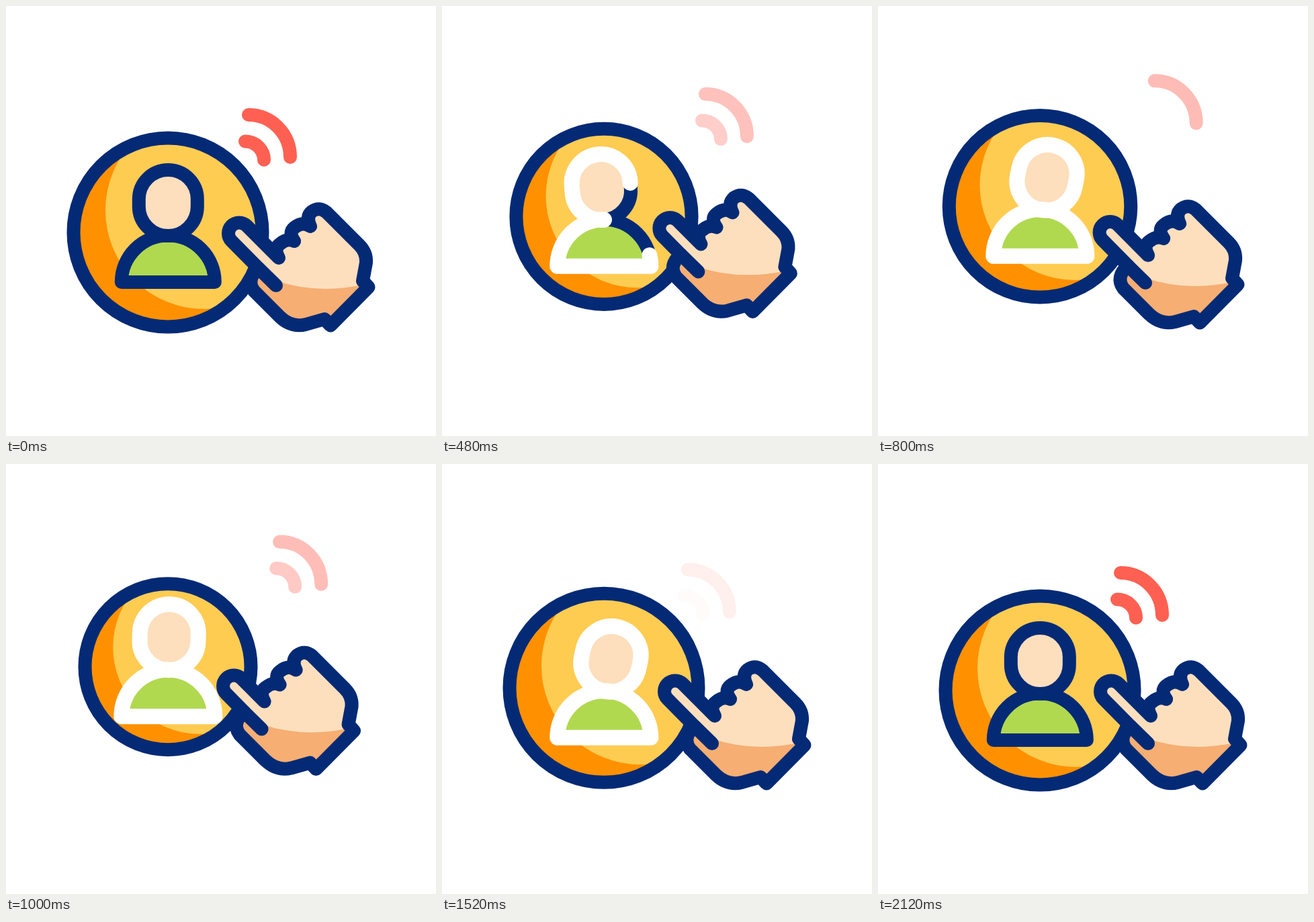
An HTML page with a canvas for the animation above (2.24 s loop, 640 by 640 pixels).

```html
<!DOCTYPE html>
<html lang="en">
<head>
<meta charset="utf-8">
<title>Tap on profile</title>
<style>
  html, body { margin: 0; width: 100%; height: 100%; overflow: hidden; background: #fff; }
  canvas { display: block; width: 640px; height: 640px; }
</style>
</head>
<body>
<canvas id="stage"></canvas>
<script>
const LOOP = 2240, STEP = 40;
const NAVY = '#042a76', RED = '#ff6052', SKIN = '#fddfbd', TAN = '#f6ae73';
const GREEN = '#b0d94f', YELLOW = '#ffcc52', ORANGE = '#ff9100';

// Keys are [time in ms, value].
const RISE = [[0, 0], [840, 1], [1680, 0]];
const PRESS = [[0, 0], [320, 17], [680, 0], [1005, 17], [1340, 0]];
const TAP = [[60, 0], [410, 24], [705, 0], [1075, 24], [1425, 0]];
const TILT = [[0, 0], [333, -10], [805, 12], [1210, -10], [1530, 12], [2000, 0]];
const TRACE = [[250, 0], [595, 1], [1710, 1], [2120, 0]];
const WAVE_OUT = [[0, 1], [335, 0], [710, 1], [865, 0], [1190, 1], [1200, 1], [1556, 0], [1690, 1]];
const WAVE_IN = [[0, 1], [220, 0], [400, 0], [660, 1], [790, 0], [930, 0], [1140, 1], [1530, 0], [1690, 1]];

const smooth = s => s * s * (3 - 2 * s);
const linear = s => s;

function at(keys, t, ease = smooth) {
  if (t <= keys[0][0]) return keys[0][1];
  for (let i = 1; i < keys.length; i++) {
    const [t0, a] = keys[i - 1], [t1, b] = keys[i];
    if (t < t1) return a + (b - a) * ease((t - t0) / (t1 - t0));
  }
  return keys[keys.length - 1][1];
}

const canvas = document.getElementById('stage');
const ctx = canvas.getContext('2d');
const ratio = window.devicePixelRatio || 1;
canvas.width = canvas.height = 640 * ratio;

function disc(x, y, r) {
  const p = new Path2D();
  p.arc(x, y, r, 0, Math.PI * 2);
  return p;
}

function fill(path, color) {
  ctx.fillStyle = color;
  ctx.fill(path);
}

function stroke(path, color = NAVY, width = 20) {
  ctx.strokeStyle = color;
  ctx.lineWidth = width;
  ctx.stroke(path);
}

function group(draw) {
  ctx.save();
  draw();
  ctx.restore();
}

// Both person shapes start at the neck, which is their origin.
const PI = Math.PI, HEAD_R = 43.5, HEAD_SIDE = 11, BODY_R = 69.5;

const head = new Path2D();
head.arc(0, -HEAD_R, HEAD_R, PI / 2, PI);
head.arc(0, -HEAD_R - HEAD_SIDE, HEAD_R, PI, 2 * PI);
head.arc(0, -HEAD_R, HEAD_R, 0, PI / 2);
head.closePath();
const headLength = 2 * PI * HEAD_R + 2 * HEAD_SIDE;

const body = new Path2D();
body.arc(0, 69, BODY_R, -PI / 2, -PI, true);
body.lineTo(BODY_R, 69);
body.arc(0, 69, BODY_R, 0, -PI / 2, true);
body.closePath();
const bodyLength = (PI + 2) * BODY_R;

function trace(path, length, part) {
  if (part <= 0) return;
  if (part < 1) ctx.setLineDash([length * part, length * 2]);
  stroke(path, '#fff', 23);
  ctx.setLineDash([]);
}

function drawCoin(y, r) {
  const k = r / 140.5;
  const coin = disc(241, y, r);
  group(() => {
    ctx.clip(coin);
    fill(coin, ORANGE);
    fill(disc(241 + 54 * k, y - 33 * k, 147 * k), YELLOW);
  });
  stroke(coin);
}

function drawPerson(y, tilt, part) {
  const inHead = draw => group(() => {
    ctx.rotate(tilt * PI / 180);
    draw();
  });
  group(() => {
    ctx.translate(241.3, y);
    fill(body, GREEN);
    stroke(body);
    inHead(() => { fill(head, SKIN); stroke(head); });
    trace(body, bodyLength, part);
    inHead(() => trace(head, headLength, part));
  });
}

// The fingertip lags behind the palm; lag slides it along the finger.
function handPath(lag) {
  const x = 347 + lag, y = 338.5 + lag, r = 16, d = r * Math.SQRT1_2;
  const p = new Path2D();
  p.moveTo(376, 390.5);
  p.lineTo(x - d, y + d);
  p.arc(x, y, r, PI * 0.75, PI * 1.75);
  p.lineTo(406, 375);
  p.quadraticCurveTo(398, 361, 408, 354);
  p.quadraticCurveTo(419, 345, 429, 350);
  p.quadraticCurveTo(420, 337, 429, 330);
  p.quadraticCurveTo(441, 320, 453, 328);
  p.quadraticCurveTo(446, 314, 455, 306);
  p.quadraticCurveTo(466, 298, 477, 307);
  p.lineTo(526, 356);
  p.quadraticCurveTo(537, 367, 536, 382);
  p.lineTo(531, 409);
  p.lineTo(539.5, 418.5);
  p.lineTo(483, 475.5);
  p.lineTo(474, 466);
  p.lineTo(446, 474);
  p.quadraticCurveTo(425, 479, 408, 463);
  p.lineTo(369, 424);
  p.quadraticCurveTo(357, 407, 376, 390.5);
  p.closePath();
  return p;
}

const handShade = new Path2D('M350 366L402 409Q465 430 535 414L560 520L350 520Z');
const fingerCrease = new Path2D('M376 390.5L402 416');

function drawHand(tap) {
  const hand = handPath(tap * 0.63);
  group(() => {
    ctx.translate(-tap, -tap);
    fill(hand, SKIN);
    group(() => {
      ctx.clip(hand);
      fill(handShade, TAN);
    });
    stroke(hand);
    stroke(fingerCrease);
  });
}

const waveOut = new Path2D('M361 162A62 63 0 0 1 423 225');
const waveIn = new Path2D('M356 201.5A28 27.5 0 0 1 384 229');

function drawWaves(shift, t) {
  group(() => {
    ctx.translate(shift, -shift);
    ctx.globalAlpha = at(WAVE_OUT, t, linear);
    stroke(waveOut, RED);
    ctx.globalAlpha = at(WAVE_IN, t, linear);
    stroke(waveIn, RED);
  });
}

function draw(t) {
  const rise = at(RISE, t);
  ctx.setTransform(ratio, 0, 0, ratio, 0, 0);
  ctx.fillStyle = '#fff';
  ctx.fillRect(0, 0, 640, 640);
  ctx.lineCap = ctx.lineJoin = 'round';
  drawCoin(337 - 39 * rise, 140.5 - at(PRESS, t));
  drawPerson(342 - 39 * rise, at(TILT, t), at(TRACE, t));
  drawWaves(51 * rise, t);
  drawHand(at(TAP, t));
}

const start = performance.now();
function tick() {
  const t = (performance.now() - start) % LOOP;
  draw(Math.floor(t / STEP) * STEP);
  requestAnimationFrame(tick);
}
tick();
</script>
</body>
</html>
```
